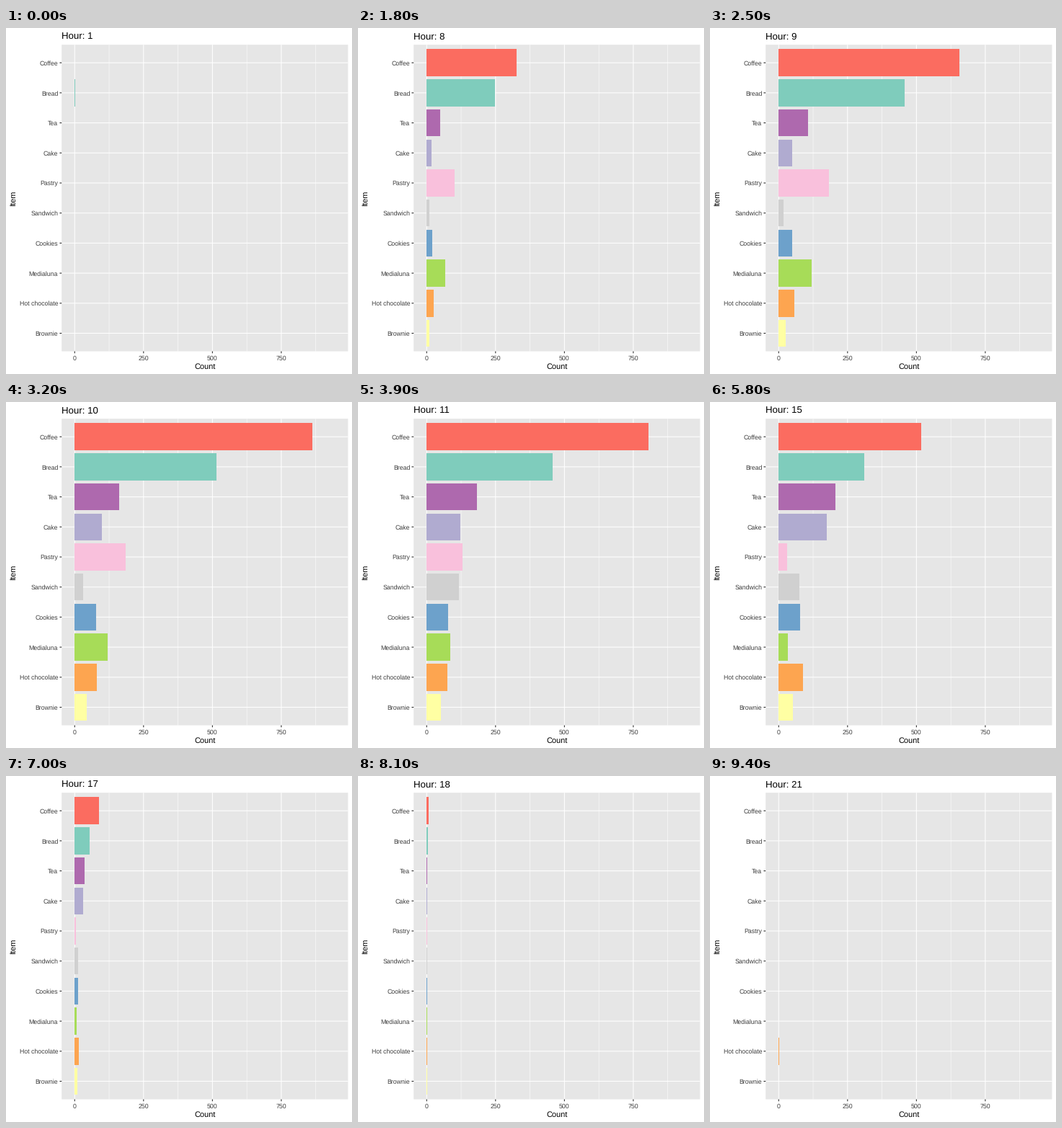
These frames come from a looping animation (480x480 px, 10 s). A matplotlib script:

```python
import numpy as np
import matplotlib.pyplot as plt
from matplotlib.animation import FuncAnimation
from matplotlib.patches import Rectangle

plt.rcParams.update({
    "font.family": "Liberation Sans",
    "text.hinting": "none",
    "toolbar": "None",
})

# Colour and sales at the key hours for each item.
KEY_HOURS = (9, 10.5, 13, 15)
MENU = {
    "Coffee": ("#fb6c60", 565, 980, 607, 518),
    "Bread": ("#7fccbc", 428, 559, 340, 311),
    "Tea": ("#ae69ae", 85, 184, 180, 206),
    "Cake": ("#b0abd0", 31, 118, 126, 174),
    "Pastry": ("#f9c0dc", 176, 202, 50, 31),
    "Sandwich": ("#d0d0d0", 17, 16, 235, 76),
    "Cookies": ("#6da1cb", 36, 93, 62, 78),
    "Medialuna": ("#a7dc58", 117, 129, 37, 33),
    "Hot chocolate": ("#fda550", 45, 95, 52, 89),
    "Brownie": ("#ffffa3", 17, 51, 55, 52),
}
LONE_SALES = {1: "Bread", 21: "Hot chocolate"}

HOURS = [1, *range(7, 22)]
STARTS = [6 * i + min(max(i - 1, 0), 4) for i in range(len(HOURS))]
FRAMES = 100
TWEEN = 3

SIZE, DPI = 480, 72
LEFT, RIGHT, TOP, BOTTOM = 77.2, 474.5, 23.2, 448.5
ROW = (BOTTOM - TOP) / 10.2
ZERO = LEFT + (RIGHT - LEFT) * 0.05 / 1.1
UNIT = (RIGHT - LEFT) / (945 * 1.1)
TEXT, TICK = "#3e3e3e", "#282828"


def sales(item, hour):
    """Follow the key hours, fading out before opening and after closing."""
    if LONE_SALES.get(hour) == item:
        return 1
    outside = max(KEY_HOURS[0] - hour, 0.7 * (hour - KEY_HOURS[-1]), 0)
    level = np.interp(hour, KEY_HOURS, MENU[item][1:])
    return round(level * np.exp(-outside ** 1.7))


def x_at(count):
    return ZERO + count * UNIT


def line(x, y, color="white", width=1.07):
    ax.plot(x, y, color=color, lw=width, zorder=1, snap=False,
            solid_capstyle="butt")


def label(x, y, text, size=8.8, color=TEXT, ha="center", **kw):
    return ax.text(x, y, text, size=size, color=color, ha=ha,
                   va="baseline", **kw)


fig = plt.figure(figsize=(SIZE / DPI, SIZE / DPI), dpi=DPI, facecolor="white")
ax = fig.add_axes([0, 0, 1, 1])
ax.set_xlim(0, SIZE)
ax.set_ylim(SIZE, 0)
ax.axis("off")

ax.add_patch(Rectangle((LEFT, TOP), RIGHT - LEFT, BOTTOM - TOP,
                       fc="#e6e6e6", lw=0, zorder=0, snap=False))

for count in range(125, 876, 250):
    line([x_at(count)] * 2, [TOP, BOTTOM], width=0.53)
for count in range(0, 751, 250):
    x = x_at(count)
    line([x, x], [TOP, BOTTOM])
    line([x, x], [BOTTOM, BOTTOM + 2.75], TICK)
    label(x, 460.6, str(count))

bars = {}
for row, (item, (color, *_)) in enumerate(MENU.items()):
    y = TOP + (row + 0.6) * ROW
    line([LEFT, RIGHT], [y, y])
    line([LEFT - 2.75, LEFT], [y, y], TICK)
    label(72.2, y + 3.5, item, ha="right")
    bar = Rectangle((ZERO, y - 0.45 * ROW), 0, 0.9 * ROW,
                    fc=color, lw=0, zorder=2)
    bars[item] = ax.add_patch(bar)

label((LEFT + RIGHT) / 2, 473, "Count", size=11, color="black")
label(12.5, (TOP + BOTTOM) / 2 - 0.8, "Item", size=11, color="black",
      rotation=90, rotation_mode="anchor")
title = label(LEFT, 16, "", size=13.2, color="black", ha="left")


def draw(frame):
    index = max(i for i, start in enumerate(STARTS) if start <= frame)
    following = min(index + 1, len(HOURS) - 1)
    t = 0
    if following > index:
        t = max(0, frame - STARTS[following] + TWEEN) / TWEEN
    for item, bar in bars.items():
        now, after = (sales(item, HOURS[i]) for i in (index, following))
        # Only bars that continue slide; the rest switch with the hour.
        if now > 1 and after > 0:
            now += (after - now) * t
        bar.set_visible(now > 0)
        bar.set_width(max(now * UNIT, 1))
    title.set_text(f"Hour: {HOURS[index]}")
    return [*bars.values(), title]


anim = FuncAnimation(fig, draw, frames=FRAMES, interval=100,
                     init_func=lambda: draw(0), repeat=True, repeat_delay=0)
plt.show()
```
